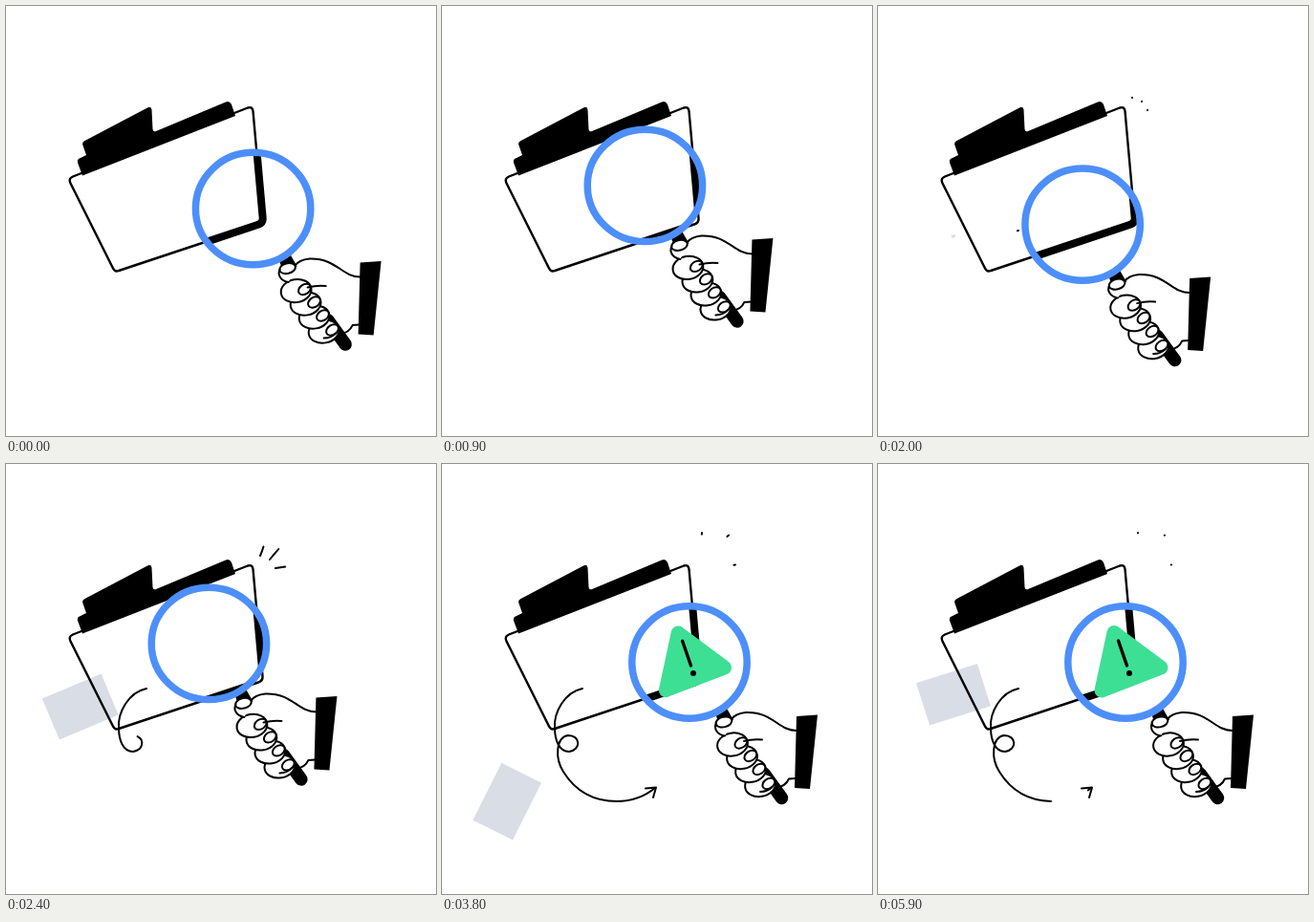
Write an HTML page that moves like this. It is 450 by 450 pixels and loops after 6 s.

```html
<!DOCTYPE html>
<html lang="en">
<head>
<meta charset="utf-8">
<title>Folder search</title>
<style>
  html, body { margin: 0; width: 100%; height: 100%; overflow: hidden; background: #fff; }
  svg { display: block; width: 100vw; height: 100vh; }
  .line { fill: none; stroke: #000; stroke-width: 2; stroke-linecap: round; stroke-linejoin: round; }
  .skin { fill: #fff; }
</style>
</head>
<body>
<svg viewBox="0 0 450 450">
  <defs>
    <clipPath id="lens"><ellipse id="lensShape" rx="60" ry="58.5"/></clipPath>
  </defs>

  <rect id="sheet" x="-33.5" y="-23.3" width="67" height="46.6" fill="#d9dde6"/>

  <!-- folder -->
  <path d="M80.500 146Q79 143 82.500 141L148 106.500Q152 104.500 152.500 108.500L153.500 129Q154 132 157 131L230 100.500Q234 99 236 103L240 115L80 177.500L75 164Q74 160 78 159L84 156Z"/>
  <path class="line" style="stroke-width:2.4" d="M70 178.500L253 106.500Q258 105 258.500 110L268.500 222Q269 227 264 228.500L118 277Q114 278.500 112 274.500L67.500 185.500Q65 180.500 70 178.500Z"/>
  <path clip-path="url(#lens)" fill="none" stroke="#000" stroke-width="8" d="M258.700 110L268.700 222Q269 227 264 228.700L118 277.500"/>

  <g id="sparks" class="line">
    <path pathLength="1" d="M266 96Q271 85 272 72"/>
    <path pathLength="1" d="M276 100Q287 86 300 74.500"/>
    <path pathLength="1" d="M282 109L307 105.500"/>
  </g>

  <g class="line">
    <path id="strokeA" pathLength="1" d="M147 235C128 239 117 260 118 276C118 288 122 301 133 301C146 299 145 284 132 284C119 286 118 308 127 322C140 343 160 353 183 353C198 353 212 348 223 339"/>
    <path id="strokeB" pathLength="1"/>
    <path id="arrowHead" d="M213 339.500L224 338.500L221 349"/>
  </g>

  <g id="alert">
    <path d="M247 176.500L296 213L234 237Z" fill="#3ddf94" stroke="#3ddf94" stroke-width="15" stroke-linejoin="round"/>
    <path class="line" style="stroke-width:3.4" d="M251.500 185L260.500 211"/>
    <circle cx="263" cy="219" r="3"/>
  </g>

  <g id="glass">
    <path class="skin" d="M371 279C352 279 346 259 318 260L303 268L305 290L340 338L363 329L370 329Z"/>
    <path d="M285.500 260L297 254L305 268L290 272Z"/>
    <path d="M371 264L393 262.500L385 340L369 339Z"/>
    <path class="line" d="M370 329L363 329.500C361 334 357 338 350 338"/>
    <path class="line" style="stroke-width:13.5" d="M337 324L355.500 349.500"/>
    <g id="fingers" class="line"></g>
    <path class="line skin" d="M287 271C284 277 288 283 296 284.500L304 268Z" style="stroke:none"/>
    <ellipse class="line skin" cx="295" cy="270" rx="8.500" ry="5.300" transform="rotate(-14 295 270)"/>
    <path class="line" d="M371 279C352 279 346 259 318 260C309 261 305 264 303 267M287 271C284 277 288 283 296 284.500M316 290Q326 287.500 335 288.500M333 343Q341 343 346 337.500"/>
    <ellipse cx="259" cy="207.500" rx="60.200" ry="58.700" fill="none" stroke="#4d8ffa" stroke-width="7.500"/>
  </g>
</svg>

<script>
const $ = id => document.getElementById(id);
const LOOP = 6000, STEP = 100;
const clamp = x => Math.min(1, Math.max(0, x));
const ease = x => (1 - Math.cos(Math.PI * clamp(x))) / 2;
const place = (el, value) => el.setAttribute('transform', value);
const show = (el, on) => { el.style.display = on ? '' : 'none'; };

// Show only the part of a stroke between two fractions of its length
function trim(el, from, to, on = true) {
  show(el, on && to > from);
  el.style.strokeDasharray = `${Math.max(0, to - from)} 9`;
  el.style.strokeDashoffset = -from;
}

// Fingers, lowest first, each with its nail
$('fingers').innerHTML = [[333, 336], [323, 321], [314, 307], [304, 293.5]].map(([x, y]) =>
  `<g transform="translate(${x} ${y}) rotate(-10)">
    <ellipse class="skin" rx="16" ry="12"/>
    <ellipse class="skin" cx="9" cy="0" rx="7" ry="5" transform="rotate(-25 9 0)"/>
  </g>`).join('');
$('strokeB').setAttribute('d', $('strokeA').getAttribute('d'));

function draw(ms) {
  const t = (Math.floor((ms % LOOP) / STEP) * STEP + 40) / 1000;
  const since = t - 2, started = since >= 0;

  // The glass circles twice, then rests
  const angle = 2 * Math.PI * Math.min(2, t / 1.5);
  const x = 231.6 + 27.4 * Math.cos(angle), y = 207.5 + 27.4 * Math.sin(angle);
  place($('glass'), `translate(${x - 259} ${y - 207.5})`);
  $('lensShape').setAttribute('cx', x);
  $('lensShape').setAttribute('cy', y);

  // The sheet falls and rises again
  const fall = (1 - Math.cos(Math.PI * since / 2)) / 2;
  show($('sheet'), started);
  place($('sheet'), `translate(${79 - 11 * fall} ${241 + 114 * fall}) rotate(${-17.5 - 46.6 * fall}) scale(${ease(since / 0.25)})`);

  const beat = started ? since % 2 : 0;
  for (const spark of $('sparks').children) trim(spark, ease(beat - 1), ease(beat), started);

  // The arrow is drawn, then a widening gap runs along it
  const gap = Math.sin(Math.max(0, t - 4) * 0.72);
  const drawn = ease(since);
  trim($('strokeA'), gap, drawn, started);
  trim($('strokeB'), 0, 0.845 * gap, t > 4);
  show($('arrowHead'), drawn > 0.98);

  const pop = ease((t - 3) / 0.9);
  show($('alert'), pop > 0);
  place($('alert'), `translate(260 210) scale(${pop}) translate(-260 -210)`);
}

function tick() {
  draw(performance.now());
  requestAnimationFrame(tick);
}
tick();
</script>
</body>
</html>
```
